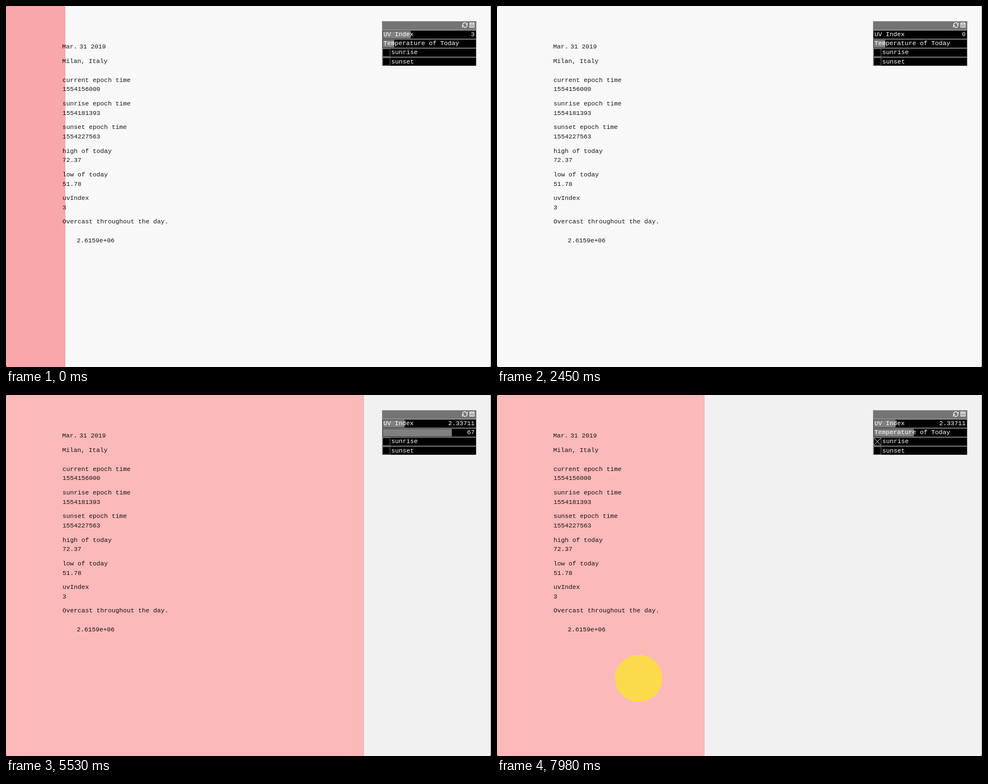
Write an HTML page that moves like this. It is 867 px wide and 646 px high and loops after 8 s.

```html
<!DOCTYPE html>
<html lang="en">
<head>
<meta charset="utf-8">
<title>Weather panel</title>
<style>
  html, body { margin: 0; width: 100%; height: 100%; overflow: hidden; background: #f8f8f8; }
  svg { display: block; width: 867px; height: 646px; }
  text { font: 11.28px "Liberation Mono", "DejaVu Sans Mono", monospace; white-space: pre; }
  #panel text { fill: #fff; }
</style>
</head>
<body>
<svg id="stage" viewBox="0 0 867 646" xmlns="http://www.w3.org/2000/svg">
  <rect id="back" width="867" height="646"/>
  <rect id="band" height="646"/>
  <rect id="edge" width="1" height="646" fill="#000" fill-opacity=".06"/>
  <circle id="sun" cx="253.4" cy="507" r="42.3" fill="#fbda4c"/>
  <g id="info" fill="#000" fill-opacity=".9"></g>
  <g id="panel">
    <rect x="672" y="27" width="169" height="80" fill="#999"/>
    <rect x="673" y="28" width="167" height="14.5" fill="#747474"/>
    <g fill="none" stroke="#fff" stroke-width="1.2">
      <path d="M816.8 35.2A3.6 3.6 0 0 1 823 31.6M823.8 33.2A3.6 3.6 0 0 1 817.6 36.8"/>
      <path d="M824.6 30V33H821.6M816 38.4V35.4H819"/>
      <path d="M829.2 30.4H836.8V37.8H829.2ZM831 30.8V33.2H835V30.8M830.8 35.6H835.2"/>
    </g>
  </g>
  <rect x="866" width="1" height="646" fill="#a8a8a8"/>
  <path d="M0 0H2L0 2ZM0 646H2L0 644ZM867 646H865L867 644Z" fill="#555"/>
</svg>
<script>
const LOOP = 8000, STEP = 70;
const LOW = 51.78, HIGH = 72.37;

// [time, value]
const UV = [[0, 3], [630, 10], [1050, 10], [1820, 0], [2660, 0], [3500, 2.33711]];
const TEMP = [[4270, 54.32], [4970, 60.4869], [5530, 67], [5600, 67], [6090, 63.3229], [6720, 60.6119]];
// [uv, r, g, b]
const TINT = [[0, 248, 248, 248], [2.337, 251, 185, 186], [3, 250, 167, 169], [7, 247, 72, 66], [10, 245, 38, 0]];
const HOVER = [3710, 7000], SUNRISE = 7630;

const $ = id => document.getElementById(id);
const linear = p => p;
const smooth = p => p * p * (3 - 2 * p);

function add(parent, tag, attrs, text = '') {
  const el = document.createElementNS('http://www.w3.org/2000/svg', tag);
  for (const k in attrs) el.setAttribute(k, attrs[k]);
  el.textContent = text;
  parent.appendChild(el);
  return el;
}

const set = (el, attrs) => { for (const k in attrs) el.setAttribute(k, attrs[k]); };
const show = (el, on) => el.setAttribute('visibility', on ? 'visible' : 'hidden');

function sample(keys, x, col = 1, ease = linear) {
  if (x <= keys[0][0]) return keys[0][col];
  for (let i = 1; i < keys.length; i++) {
    const a = keys[i - 1], b = keys[i];
    if (x <= b[0]) return a[col] + (b[col] - a[col]) * ease((x - a[0]) / (b[0] - a[0]));
  }
  return keys[keys.length - 1][col];
}

const format = v => String(Number(v.toPrecision(6)));

// Weather report
const info = $('info');
const line = (x, y, s) => add(info, 'text', { x, y }, s);
line(100.5, 76.2, 'Mar.');
line(131.3, 76.2, '31 2019');
line(100.5, 101.8, 'Milan, Italy');
[
  ['current epoch time', '1554156000'],
  ['sunrise epoch time', '1554181393'],
  ['sunset epoch time', '1554227563'],
  ['high of today', '72.37'],
  ['low of today', '51.78'],
  ['uvIndex', '3'],
  ['Overcast throughout the day.', '']
].forEach(([name, value], i) => {
  const y = 135.6 + i * 42.3;
  line(101, y, name);
  line(101, y + 16.8, value);
});
line(126.5, 423.2, '2.6159e+06');

// Control panel
const panel = $('panel');
const row = i => {
  const y = 44 + i * 16.1;
  add(panel, 'rect', { x: 673, y, width: 167, height: 14.6, fill: '#000' });
  return y;
};

function slider(i, label) {
  const y = row(i);
  const fill = add(panel, 'rect', { x: 673.5, y: y + .5, height: 13.4, fill: '#808080' });
  const name = add(panel, 'text', { x: 674.8, y: y + 10.2 }, label);
  const value = add(panel, 'text', { x: 837.8, y: y + 10.2, 'text-anchor': 'end' });
  return { fill, name, value };
}

function toggle(i, label) {
  const y = row(i);
  add(panel, 'rect', { x: 673.5, y: y + .5, width: 13, height: 13.4, fill: '#000', stroke: '#666' });
  const mark = add(panel, 'path', {
    d: `M674 ${y + 1}l12 12.4m0 -12.4l-12 12.4`, stroke: '#ddd', fill: 'none'
  });
  add(panel, 'text', { x: 688.7, y: y + 10.2 }, label);
  return mark;
}

const uvRow = slider(0, 'UV Index');
const tempRow = slider(1, 'Temperature of Today');
const sunriseMark = toggle(2, 'sunrise');
show(toggle(3, 'sunset'), false);

function draw(t) {
  const uv = sample(UV, t, 1, smooth);
  const temp = sample(TEMP, t);
  const part = (temp - LOW) / (HIGH - LOW);
  const width = 867 * part - 1;
  const rgb = [1, 2, 3].map(c => Math.round(sample(TINT, uv, c)));
  const grey = Math.round(sample([[54.32, 248], [60, 241]], temp));

  set($('back'), { fill: `rgb(${grey},${grey},${grey})` });
  set($('band'), { width, fill: `rgb(${rgb})` });
  set($('edge'), { x: Math.floor(width) });
  show($('edge'), uv > 0);

  set(uvRow.fill, { width: 16.7 * uv });
  uvRow.value.textContent = format(uv);

  const hover = t >= HOVER[0] && t < HOVER[1];
  set(tempRow.fill, { width: 167 * part });
  tempRow.value.textContent = format(temp);
  show(tempRow.name, !hover);
  show(tempRow.value, hover);

  const risen = t >= SUNRISE;
  show($('sun'), risen);
  show(sunriseMark, risen);
}

const start = performance.now();
function tick() {
  const t = (performance.now() - start) % LOOP;
  draw(Math.floor(t / STEP) * STEP);
  requestAnimationFrame(tick);
}
draw(0);
requestAnimationFrame(tick);
</script>
</body>
</html>
```
